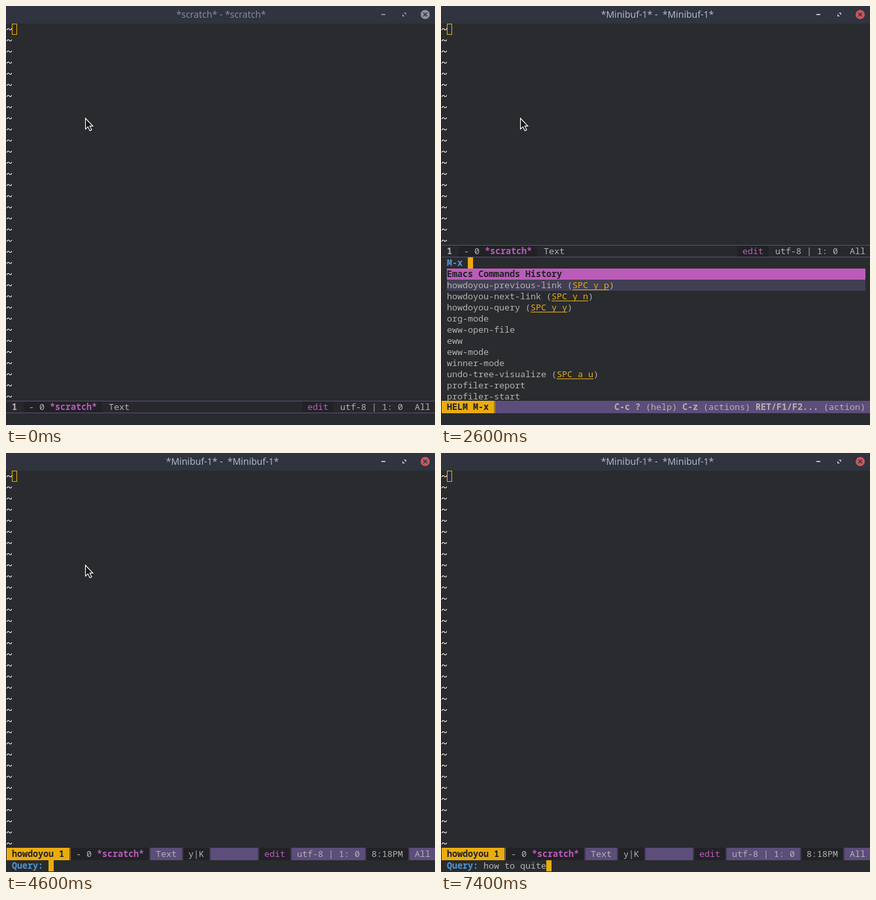
An HTML page that plays this animation: 656 by 640 pixels, repeating every 8000 ms.

```html
<!DOCTYPE html>
<html lang="en">
<head>
<meta charset="utf-8">
<title>Editor session</title>
<style>
  html, body { margin: 0; width: 100%; height: 100%; overflow: hidden; background: #292b2e; }
  svg { display: block; width: 656px; height: 640px; }
  text { font: 13.3333px "Noto Sans Mono", "DejaVu Sans Mono", monospace; white-space: pre; fill: #b2b2b2; }
  .bold { font-weight: 700; }
  .title { font: 14px "Noto Sans", "Open Sans", sans-serif; text-anchor: middle; }
</style>
</head>
<body>
<svg id="stage" viewBox="0 0 656 640"></svg>
<script>
const LOOP = 8000, CHAR = 8, ROW = 17, TOP = 27, LEFT = 9;
const C = {
  bg: '#292b2e', text: '#b2b2b2', dark: '#212226', ink: '#222226', purple: '#5d4d7a',
  pink: '#bc5cbc', gold: '#e9ac10', blue: '#4f97d7', select: '#423f52', header: '#bc5cb9'
};
const stage = document.getElementById('stage');

const rect = (x, y, w, h, fill) => `<rect x="${x}" y="${y}" width="${w}" height="${h}" fill="${fill}"/>`;
const text = (x, y, str, fill = C.text, cls = '') =>
  `<text x="${x}" y="${y}" class="${cls}" style="fill:${fill}">${str}</text>`;
const bold = (x, y, str, fill) => text(x, y, str, fill, 'bold');
const block = (x, y) => rect(x, y, CHAR, ROW, C.gold);

const commands = [
  ['howdoyou-previous-link', 'SPC y p'], ['howdoyou-next-link', 'SPC y n'],
  ['howdoyou-query', 'SPC y y'], ['org-mode'], ['eww-open-file'], ['eww'], ['eww-mode'],
  ['winner-mode'], ['undo-tree-visualize', 'SPC a u'], ['profiler-report'], ['profiler-start']
];

// [start time, text typed so far]
const typing = [
  [4600, ''], [5500, 'h'], [5700, 'ho'], [5800, 'how'], [6200, 'how t'], [6300, 'how to'],
  [6400, 'how to '], [6800, 'how to qu'], [7200, 'how to qui'], [7400, 'how to quite']
];

function titleBar(focused, minibuffer) {
  const ink = focused ? '#afb8c6' : '#858c98';
  const label = minibuffer ? '*Minibuf-1* -  *Minibuf-1*' : '*scratch* - *scratch*';
  return rect(0, 0, 656, TOP, '#2f343f') +
    text(minibuffer ? 331 : 329, 18, label, ink, 'title') +
    rect(574, 12, 6, 2, ink) +
    `<path d="M608 10h4v4zM606 12v4h4z" fill="${ink}"/>
     <circle cx="641" cy="13" r="7" fill="${focused ? '#cc575d' : '#8b9099'}"/>
     <path d="M638.2 10.2l5.6 5.6m0-5.6l-5.6 5.6" stroke="#2f343f" stroke-width="1.5"/>`;
}

function tildes(count) {
  let d = '';
  for (let i = 0; i < count; i++) {
    const y = TOP + i * ROW + 7;
    d += `M1 ${y + 1}h2v1h-2zM2 ${y}h3v1h-3zM8 ${y}h1v1h-1zM4 ${y + 1}h2v1h-2z` +
         `M7 ${y + 1}h2v1h-2zM1 ${y + 2}h1v1h-1zM5 ${y + 2}h3v1h-3z`;
  }
  return `<path d="${d}" fill="#c9c9c9"/>`;
}

function idleModeline(y) {
  const base = y + 14;
  return rect(1, y, 655, 19, '#27282c') +
    rect(27, y, 120, 19, C.dark) + rect(453, y, 48, 19, C.dark) +
    rect(1, y, 655, 1, C.purple) + rect(1, y + 18, 655, 1, C.purple) +
    bold(9, base, '1') + text(35, base, '- 0') + bold(67, base, '*scratch*', C.pink) +
    text(157, base, 'Text') + text(461, base, 'edit', C.pink) +
    text(511, base, 'utf-8 | 1: 0') + text(625, base, 'All');
}

function activeModeline() {
  const y = 603, base = 617;
  const darkSpans = [[99, 219], [271, 311], [387, 435], [551, 615]];
  return rect(1, y, 655, 19, C.purple) + rect(1, y, 97, 19, C.gold) +
    darkSpans.map(([a, b]) =>
      rect(a - 2, y, 2, 19, '#41384f') + rect(a, y, b - a, 19, C.dark) +
      rect(b, y, 2, 19, '#41384f')).join('') +
    rect(98, y, 1, 19, '#9a7519') +
    bold(9, base, 'howdoyou 1', C.ink) + text(107, base, '- 0') +
    bold(139, base, '*scratch*', C.pink) + text(229, base, 'Text') + text(279, base, 'y|K') +
    text(395, base, 'edit', C.pink) + text(445, base, 'utf-8 | 1: 0') +
    text(559, base, '8:18PM') + text(625, base, 'All');
}

function commandRow([name, keys], i, selected) {
  const y = 418 + i * ROW, base = y + 13;
  let out = i === selected ? rect(LEFT, y, 640, ROW, C.select) : '';
  if (!keys) return out + text(LEFT, base, name);
  const x = LEFT + (name.length + 2) * CHAR, w = keys.length * CHAR;
  return out + text(LEFT, base, name + ' (') + text(x, base, keys, C.gold) +
    rect(x, base + 2, w, 1, C.gold) + text(x + w, base, ')');
}

function helm(selected) {
  const key = s => `<tspan class="bold">${s}</tspan>`;
  return idleModeline(365) +
    bold(LEFT, 397, 'M-x', C.blue) + block(41, 384) +
    rect(LEFT, 401, 640, ROW, C.header) + bold(LEFT, 414, 'Emacs Commands History', C.ink) +
    commands.map((c, i) => commandRow(c, i, selected)).join('') +
    rect(1, 603, 655, 19, C.purple) + rect(1, 603, 80, 19, C.gold) +
    rect(81, 603, 1, 19, '#8a6a1c') + rect(82, 603, 1, 19, '#c08f16') +
    bold(LEFT, 617, 'HELM M-x', C.ink) +
    text(265, 617, `${key('C-c ?')} (help) ${key('C-z')} (actions) ${key('RET/F1/F2...')} (action)`) +
    rect(1, 622, 655, 14, C.bg);
}

function prompt(typed) {
  return bold(LEFT, 635, 'Query:', C.blue) + text(65, 635, typed) +
    block(65 + typed.length * CHAR, 622);
}

const pointer = `<path d="M121.5 171.5V188L125.3 184.6L128.2 190.6L131 189.3L128.2 183.4H132.8Z"
  fill="#17181a" stroke="#fff" stroke-width="1.1"/>`;

function scene(t) {
  const active = t >= 700, minibuffer = t >= 2600, listing = minibuffer && t < 4600;
  let out = rect(0, 0, 656, 640, C.bg) + rect(0, TOP, 1, 613, '#20242b') +
    rect(0, 636, 656, 4, '#272b32') + titleBar(t >= 600, minibuffer) +
    tildes(listing ? 20 : 34);
  out += active && !minibuffer ? block(LEFT, TOP)
    : `<rect x="9.5" y="27.5" width="7" height="16" fill="none" stroke="${C.gold}"/>`;
  if (listing) out += helm(t < 3700 ? 0 : t < 4400 ? 1 : 2);
  else out += active ? activeModeline() : idleModeline(603);
  if (t >= 2400 && t < 2600) out += text(LEFT, 635, 'SPC-');
  if (t >= 4600) out += prompt(typing.filter(([at]) => t >= at).pop()[1]);
  if (t < 5500) out += pointer;
  return out;
}

let shown = '';
const start = performance.now();
function tick() {
  const next = scene((performance.now() - start) % LOOP);
  if (next !== shown) stage.innerHTML = shown = next;
  requestAnimationFrame(tick);
}
tick();
</script>
</body>
</html>
```
